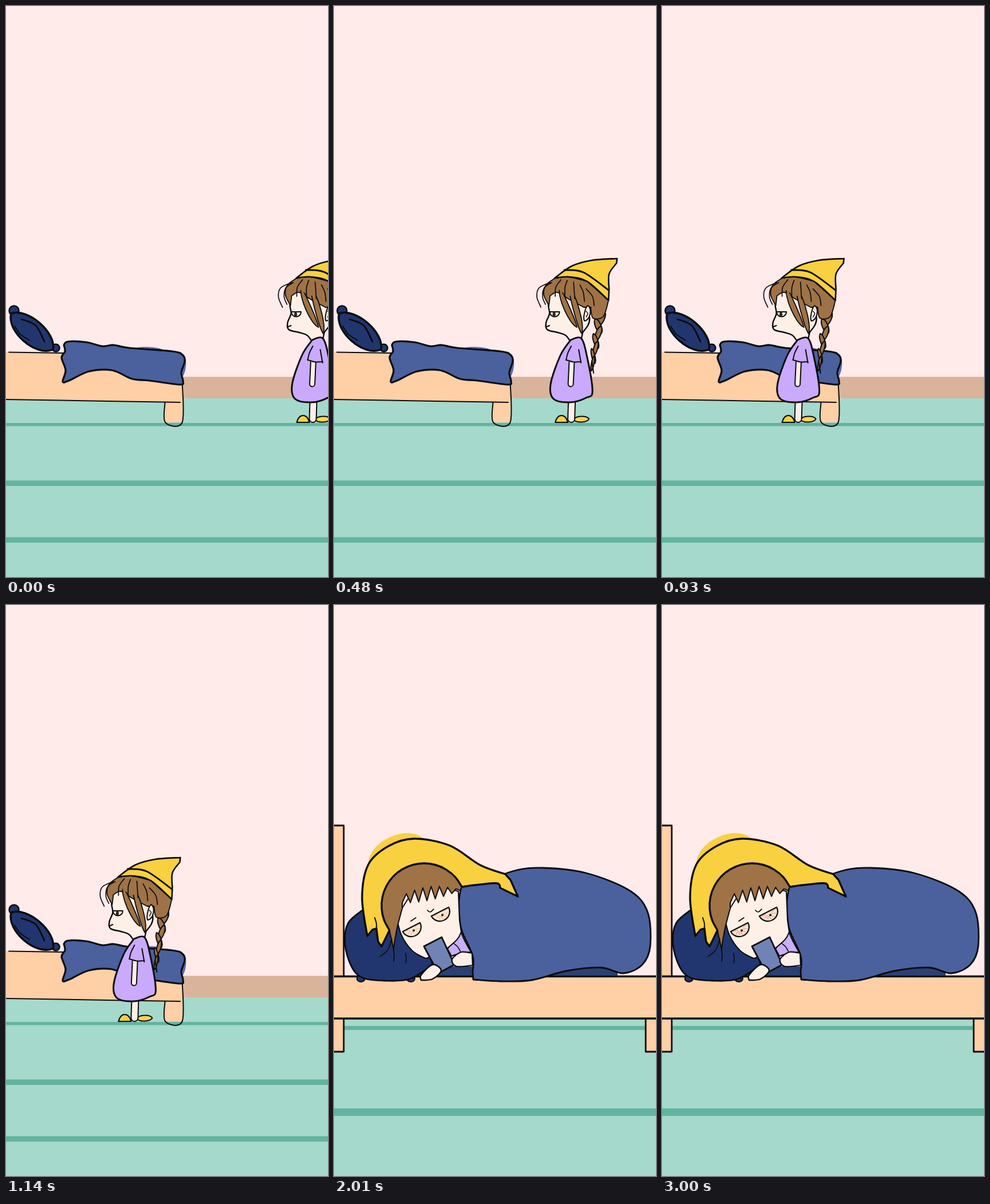
Animation, 562 px wide and 997 px high, one loop 3030 ms. Source, as an HTML page with a canvas:

```html
<!DOCTYPE html>
<html lang="en">
<head>
<meta charset="utf-8">
<title>Bedtime</title>
<style>
html, body { margin: 0; width: 100%; height: 100%; overflow: hidden; background: #feebea; }
canvas { display: block; width: 562px; height: 997px; }
</style>
</head>
<body>
<canvas id="stage" width="562" height="997"></canvas>
<script>
const ctx = document.getElementById('stage').getContext('2d');
const W = 562, H = 997, LOOP = 3030, CUT = 1230, STEP = 30;
const INK = '#0c0b0d', WALL = '#feebea', FLOOR = '#a5d9cb', STRIPE = '#62b4a0', WOOD = '#ffcfa5',
  BLUE = '#4a619e', NAVY = '#21366f', HAIR = '#9f7346', SKIN = '#fef0e6', GOLD = '#f8d040', LILAC = '#c9aafd';

ctx.lineJoin = ctx.lineCap = 'round';

const range = n => [...Array(n).keys()];
const clamp = v => Math.max(0, Math.min(1, v));
const mix = (a, b, u) => a + (b - a) * u;

// Smooth curve through a flat list of x, y pairs.
function curve(p) {
  const last = p.length / 2 - 1;
  const at = i => { i = Math.max(0, Math.min(last, i)) * 2; return [p[i], p[i + 1]]; };
  for (let i = 0; i < last; i++) {
    const [a, b, c, d] = [at(i - 1), at(i), at(i + 1), at(i + 2)];
    ctx.bezierCurveTo(b[0] + (c[0] - a[0]) / 6, b[1] + (c[1] - a[1]) / 6,
      c[0] - (d[0] - b[0]) / 6, c[1] - (d[1] - b[1]) / 6, c[0], c[1]);
  }
}

// Curved runs joined at sharp corners.
function trace(runs) {
  ctx.beginPath();
  for (const run of runs) {
    ctx.lineTo(run[0], run[1]);
    curve(run);
  }
}

function outline(width, color = INK) {
  ctx.lineWidth = width;
  ctx.strokeStyle = color;
  ctx.stroke();
}

function paint(fill, width) {
  ctx.closePath();
  ctx.fillStyle = fill;
  ctx.fill();
  if (width) outline(width);
}

function shape(fill, width, ...runs) {
  trace(runs);
  paint(fill, width);
}

function line(width, ...pts) {
  trace([pts]);
  outline(width);
}

function rect(fill, x, y, w, h, width = 0) {
  ctx.beginPath();
  ctx.rect(x, y, w, h);
  paint(fill, width);
}

function oval(fill, width, x, y, rx, ry = rx) {
  ctx.beginPath();
  ctx.ellipse(x, y, rx, ry, 0, 0, 7);
  paint(fill, width);
}

// Leaf between two points, bulging to either side.
function leaf(fill, width, x1, y1, x2, y2, left, right = left) {
  const len = Math.hypot(x2 - x1, y2 - y1);
  const nx = (y2 - y1) / len, ny = (x1 - x2) / len;
  const ctrl = (u, b) => [mix(x1, x2, u) + nx * b / 0.75, mix(y1, y2, u) + ny * b / 0.75];
  ctx.beginPath();
  ctx.moveTo(x1, y1);
  ctx.bezierCurveTo(...ctrl(0.15, left), ...ctrl(0.85, left), x2, y2);
  ctx.bezierCurveTo(...ctrl(0.85, -right), ...ctrl(0.15, -right), x1, y1);
  paint(fill, width);
}

function limb(x1, y1, x2, y2, width) {
  trace([[x1, y1, x2, y2]]);
  outline(width);
  outline(width - 4, SKIN);
}

// Points on a circle, as a flat list.
const arc = (x, y, r, from, to, n = 12) => range(n + 1).flatMap(i => {
  const a = mix(from, to, i / n);
  return [x + r * Math.cos(a), y + r * Math.sin(a)];
});

function room() {
  rect(WALL, 0, 0, W, H);
  rect('#dab39b', 300, 647.5, 262, 38);
  rect(FLOOR, 0, 685, W, 312);
  rect(STRIPE, 0, 728, W, 5.5);
  for (const y of [828.5, 927.5]) rect(STRIPE, 0, y, W, 9.5);

  rect(WOOD, 277, 685, 31, 42);
  shape(WOOD, 0, [0, 604, 308, 608], [308, 692, 0, 687]);
  line(2, 5, 604.5, 100, 606);
  line(2, 0, 687, 150, 689.5, 304, 692);
  line(2, 277.5, 692, 278, 727, 307.5, 727, 307.5, 655);

  leaf('#5a69b0', 0, 225, 598, 275, 601, 4);
  leaf('#5a69b0', 0, 311, 610, 307, 648, 5, 0);
  shape(BLUE, 3.2, [101, 592, 108, 586, 140, 587, 168, 594, 188, 592, 215, 597, 290, 603, 308, 609, 312, 620, 306, 640,
    309, 655, 303, 661, 250, 654, 220, 651, 185, 636, 145, 638, 110, 654, 99, 656, 104, 636, 97, 614, 103, 603, 101, 592]);

  oval(NAVY, 2.5, 14, 532, 8.5);
  oval(NAVY, 2.5, 87, 597, 6.5);
  leaf(NAVY, 3.5, 9, 537, 82, 600, 20, 22);
  line(3, 27, 547, 52, 558, 67, 586);
  line(2, 15, 559, 25, 573, 41, 584);
}

// Alternating lobes that shrink down the plait.
function braid() {
  for (const i of range(8)) {
    const y = 530 + i * 13, x = 467 - i * 2.3, size = 8 - i * 0.7, side = i % 2 ? 1 : -1;
    leaf(HAIR, 2, x + side * size, y - 10, x - side * size * 0.6, y + 16, size * 0.75);
  }
  line(2, 450, 620, 453, 641);
}

function girl() {
  braid();

  // feet
  leaf('#fbd25a', 2, 418, 722, 445, 721, 5);
  limb(415, 690, 414, 721, 14);
  leaf(GOLD, 2.2, 386, 727, 408, 727, 12, 0);

  // face
  shape(SKIN, 2.4, [376, 500, 374, 522, 376, 537, 370, 553, 372, 565, 390, 570, 404, 575, 412, 585], [431, 584],
    [434, 570, 446, 545, 430, 490]);
  line(2, 371, 560, 376, 558);
  ctx.beginPath();
  ctx.arc(385, 534, 8.5, 0, Math.PI);
  paint('#fffaf5', 2);
  oval('#3a2017', 0, 384, 538.5, 2.6, 4);

  // dress
  shape(LILAC, 3, [413, 583, 431, 580, 441, 610, 451, 672, 440, 684, 412, 692, 383, 686, 378, 660, 395, 610, 413, 583]);
  limb(415, 618, 413, 660, 11);
  shape(LILAC, 0, [414, 594, 406, 619, 431, 621], [430, 597]);
  line(2, 414, 594, 408, 606, 405, 618);
  line(2, 405, 618, 418, 621.5, 431, 621);
  line(2, 431, 623, 427, 600);

  // hair
  shape(HAIR, 1.8, [386, 475, 370, 487, 366, 504, 375, 523], [377, 506, 390, 500, 410, 512, 436, 526],
    [448, 526, 452, 545, 470, 542, 479, 514], [442, 481, 410, 473, 386, 475]);
  leaf(HAIR, 1.8, 394, 492, 424, 561, 2, 8);
  leaf(HAIR, 1.8, 411, 494, 432, 572, 7, 3);
  leaf(HAIR, 0, 385, 482, 425, 505, 6, 9);
  leaf(SKIN, 2, 443, 523, 437, 550, 7, 3);
  line(1.5, 440, 533, 443, 537, 440, 543);
  for (const i of range(5)) {
    const x = 396 + i * 11, y = 478 + i * i;
    line(1.7, x, y, x + i * 5 - 9, y + 13, x + i * 6 - 10, y + 29);
  }
  for (const i of range(2)) line(1.7, 377 + i * 3, 483, 358 + i * 9, 492, 354 + i * 10, 508, 361 + i * 8, 526 - i * 5);

  // hat
  shape(GOLD, 2.6, [385, 475, 415, 454, 450, 444, 494, 441], [493, 449, 480, 468, 480, 494],
    [479, 514, 442, 481, 410, 473, 385, 475]);
  line(3, 402, 461, 435, 465, 479, 496);
}

function eye(x, y, red) {
  ctx.save();
  ctx.translate(x, y);
  ctx.rotate(-0.48);
  ctx.beginPath();
  ctx.ellipse(0, 0, 17, 16.5, 0, 0, Math.PI);
  paint(`rgb(253, ${232 - 5 * red}, ${209 + 4 * red})`, 2.2);
  ctx.beginPath();
  for (const i of range(7)) {
    const a = 0.1 + i * 0.49, dx = Math.cos(a), dy = Math.sin(a);
    ctx.moveTo(dx * 13, 1 + dy * 13);
    ctx.lineTo(dx * 8 - dy * 2, 2 + dy * 8);
    ctx.lineTo(dx * 5, 3 + dy * 5);
  }
  outline(1, `rgba(190, 95, 70, ${0.35 + 0.25 * red})`);
  oval('#2a1712', 0, 1, 7, 2);
  ctx.restore();
}

function bed(red) {
  rect(WALL, 0, 0, W, H);
  rect(FLOOR, 0, 722, W, 275);
  rect(STRIPE, 0, 735, W, 7);
  rect(STRIPE, 0, 879, W, 13);
  rect(WOOD, -5, 385, 22, 265, 2.8);
  for (const x of [-13, 544]) rect(WOOD, x, 720, 30, 60, 2.8);
  rect(WOOD, -5, 648.5, W + 10, 73.5, 3.6);

  // pillow
  rect('#2a4175', 140, 631, 355, 16);
  for (const x of [47, 134]) oval(NAVY, 2.2, x, 652, 7, 6);
  shape(NAVY, 2.8, [52, 531, 25, 555, 19, 590, 30, 630, 50, 651, 90, 656, 132, 653, 170, 630], [180, 600, 110, 545]);

  // blanket
  shape(BLUE, 2.8, [222, 493, 260, 484, 315, 464, 365, 459, 440, 468, 515, 498, 547, 535, 552, 595, 538, 628, 505, 643,
    465, 633, 405, 639, 345, 655, 290, 657, 243, 654], [242, 640, 242, 612, 222, 565, 218, 520, 222, 493]);

  // face and collar
  shape('#c9aff9', 2, [222, 572, 228, 586, 239, 606], [222, 607, 205, 613], [198, 600]);
  line(1.6, 208, 590, 216, 597, 221, 606);
  shape(SKIN, 2, [109, 545, 118, 577, 137, 604, 160, 617], [185, 610, 214, 585, 222, 571], [219, 550, 217, 500], [150, 480]);

  // hair under the hat, with a ragged fringe
  const brim = arc(157, 525, 74, -0.46, -3.76);
  const fringe = range(15).map(i => [
    mix(119, 220, i / 14), mix(516, 498, i / 14) + (i % 2 ? -16 : 8) * Math.sin((i + 3) / 5.5)]);
  shape(HAIR, 2, brim, [104, 601], [106, 586, 111, 560, 119, 530], ...fringe);
  line(1.8, 104, 601, 105, 612, 104, 622);
  line(1.6, 101, 583, 94, 602, 80, 614);
  line(1.6, 125, 608, 126, 618, 125, 625);

  // hat
  leaf(GOLD, 0, 60, 452, 155, 407, 26, 0);
  shape(GOLD, 3.4, [58, 578, 49, 510, 60, 453, 95, 421, 140, 408, 202, 420, 255, 454, 299, 470], [308, 480, 321, 509],
    [290, 494, 285, 486, 255, 488, 230, 491], brim, [90, 582, 83, 596], [77, 588, 74, 565], [67, 567]);
  line(2, 74, 568, 74, 556, 71, 546);

  line(1.7, 134, 552, 143, 546);
  line(1.7, 163, 533, 168, 536, 174, 531);
  eye(135, 562.5, red);
  eye(185, 535.5, red);

  // phone and hands
  shape('#7083b5', 2.8, [157, 596], [188, 580], [210, 628], [182, 643]);
  shape(SKIN, 2.4, [152, 655, 152, 646, 172, 628, 187, 638, 172, 653, 152, 655]);
  shape(SKIN, 2.2, [241, 608, 222, 606, 206, 619, 214, 631, 242, 629]);
}

// Distance walked: quick start, steady pace, long slow-down.
function walked(t) {
  const speed = 13.9 / STEP, start = 180, ramp = 76, brake = 720, stop = 1110, power = 2.3;
  if (t < start + ramp) return speed * Math.max(0, t - start) ** 2 / (2 * ramp);
  const cruise = speed * (Math.min(t, brake) - start - ramp / 2);
  const u = clamp((t - brake) / (stop - brake));
  return cruise + speed * (stop - brake) / power * (1 - (1 - u) ** power);
}

const begin = performance.now();

function draw(now) {
  const t = Math.floor(Math.max(0, now - begin) % LOOP / STEP) * STEP;
  if (t < CUT) {
    room();
    ctx.save();
    ctx.translate(121.5 - walked(t), 0);
    girl();
    ctx.restore();
  } else {
    bed(clamp((t - 1980) / 1020));
  }
  requestAnimationFrame(draw);
}
draw(begin);
</script>
</body>
</html>
```
